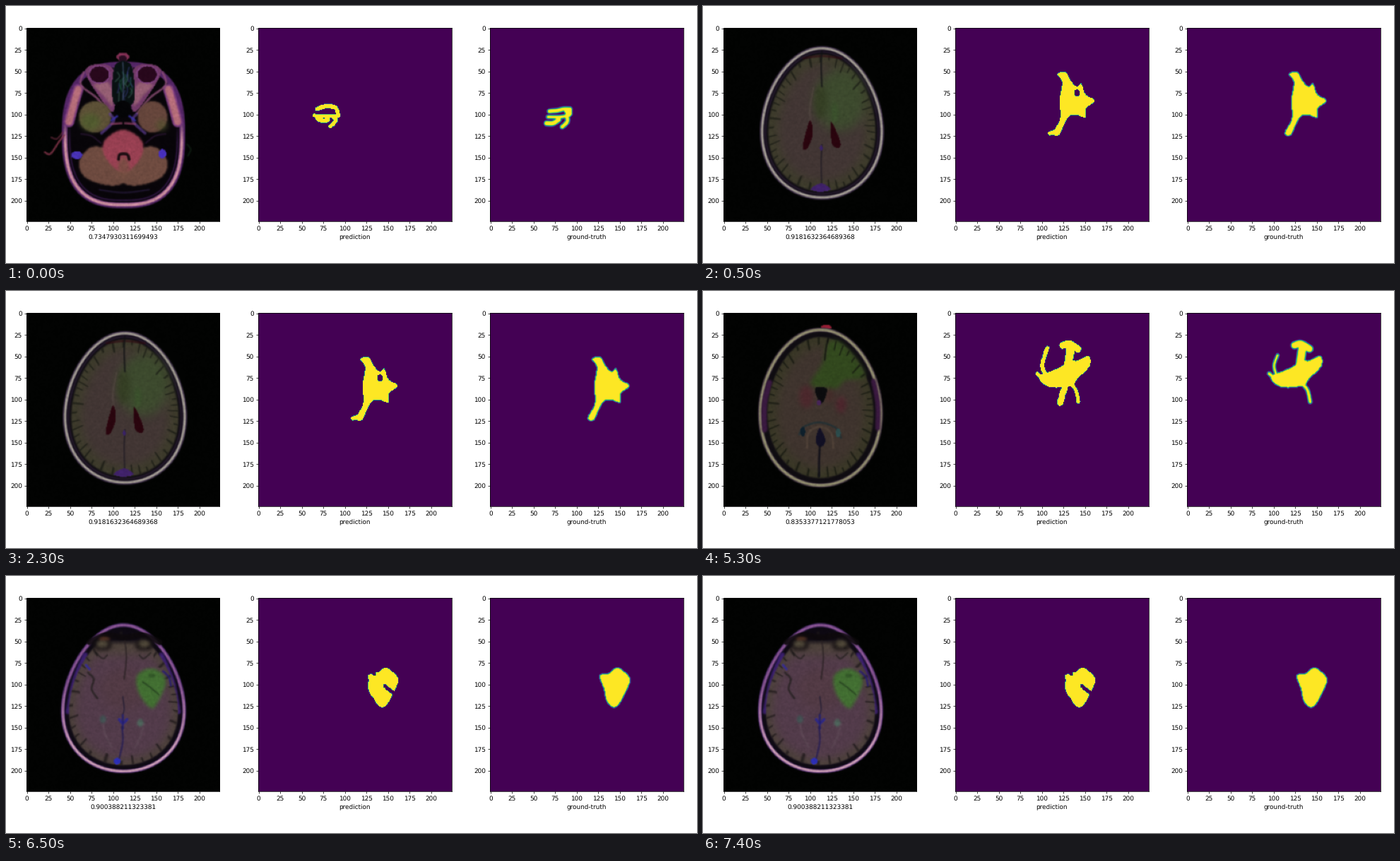
A matplotlib script for the animation above (8000 ms loop, 978x364 px).

```python
import matplotlib.pyplot as plt
import numpy as np
from matplotlib.animation import FuncAnimation
from matplotlib.path import Path

W, H, DPI = 978, 364, 64
N, SIZE = 224, 273.4
LEFT, TOP, STRIDE = 29.0, 31.2, 328.1
STEP = 500
rng = np.random.default_rng(7)

# Shapes are placed in stage pixels inside the first panel, y down.
cell = (np.arange(N) + 0.5) * SIZE / N
GX, GY = np.meshgrid(LEFT + cell, TOP + cell)
SPOTS = np.column_stack([GX.ravel(), GY.ravel()])
FREQ = np.fft.fftfreq(N)
F2 = FREQ[:, None] ** 2 + FREQ[None, :] ** 2


def blur(a, s):
    return np.fft.ifft2(np.fft.fft2(a) * np.exp(-2 * (np.pi * s) ** 2 * F2)).real


def ramp(d, soft=1.4):
    return np.clip(d / soft + 0.5, 0, 1)


def curve(pts, closed=True, n=6):
    """Catmull-Rom spline through the points."""
    p = np.array(pts, float)
    p = np.vstack([p[-1:], p, p[:2]] if closed else [p[:1], p, p[-1:]])
    t = np.arange(n)[:, None] / n
    out = [b + t / 2 * (c - a + t * (2 * a - 5 * b + 4 * c - d + t * (3 * (b - c) + d - a)))
           for a, b, c, d in zip(p, p[1:], p[2:], p[3:])]
    return np.vstack(out + [p[-2:-1]])


def blob(*pts):
    return Path(curve(pts)).contains_points(SPOTS).reshape(N, N).astype(float)


def oval(x, y, rx, ry):
    return (np.hypot((GX - x) / rx, (GY - y) / ry) < 1).astype(float)


def line(w, *pts):
    p = curve(pts, closed=False)
    dist = np.full((N, N), 1e9)
    for (x, y), (u, v) in zip(p, p[1:] - p[:-1]):
        t = np.clip(((GX - x) * u + (GY - y) * v) / (u * u + v * v), 0, 1)
        dist = np.minimum(dist, np.hypot(GX - x - t * u, GY - y - t * v))
    return ramp(w / 2 - dist)


class Scan:
    """A head slice: an egg outline with bands at set depths below the skin."""

    def __init__(self, top, bottom, rx, taper=0.0, power=2.0, cx=167, back=(2, 3, 2)):
        self.img = np.ones((N, N, 3)) * back
        cy, ry = (top + bottom) / 2, (bottom - top) / 2
        u = (GY - cy) / ry
        side = np.abs(GX - cx) / (rx * (1 + taper * np.clip(u, -1, 1)))
        f = (side ** power + np.abs(u) ** power) ** (1 / power)
        gy, gx = np.gradient(f, SIZE / N)
        self.depth = (1 - f) / np.hypot(gx, gy)
        self.angle = np.arctan2(GY - cy, GX - cx)

    def paint(self, mask, rgb, alpha=1.0, soft=0.6, twin=False):
        if twin:
            mask = np.maximum(mask, mask[:, ::-1])
        self.img += blur(mask, soft)[..., None] * alpha * (np.array(rgb) - self.img)

    def band(self, lo, hi=999, soft=1.4):
        return ramp(self.depth - lo, soft) * ramp(hi - self.depth, soft)

    def folds(self, at, count, reach, rgb):
        """Short dark grooves running inward from the brain's edge."""
        spike = np.abs(np.sin(count / 2 * self.angle + np.sin(5 * self.angle))) ** 18
        tip = at + reach * (0.4 + 0.6 * np.sin(7 * self.angle + 1) ** 2)
        self.paint(spike * self.band(at, tip), rgb, 0.75, 0.5)

    def finish(self):
        grain = blur(rng.normal(size=(N, N, 3)).sum(2), 0.8)
        return np.clip(self.img * (1 + 0.04 * grain[..., None]) / 255, 0, 1)


def skull_base():
    s = Scan(79, 286, 87, power=2.6, cx=166)
    low = ramp(GY - 178, 30)
    s.paint(oval(165, 72, 9, 6), (130, 48, 84))
    s.paint(oval(165, 75, 6, 5), (40, 12, 32))
    s.paint(s.band(0), (84, 38, 102))
    s.paint(s.band(8), (8, 5, 9))
    s.paint(s.band(2.5, 7) * low, (186, 122, 150))
    s.paint(s.band(3.8, 5.5) * low, (216, 164, 166), 0.7)
    s.paint(s.band(10, 12) * low, (62, 28, 88), 0.7)

    # Face: muscles, orbits and nose.
    s.paint(line(15, (102, 118), (96, 138), (89, 164)), (112, 52, 122), twin=True)
    s.paint(line(10, (102, 118), (96, 138), (89, 164)), (182, 110, 122), soft=1, twin=True)
    orbit = blob((112, 92), (133, 82), (152, 90), (156, 118), (151, 150), (132, 129))
    s.paint(orbit, (114, 58, 104), twin=True)
    s.paint(blob((124, 112), (146, 110), (151, 142), (137, 126)), (158, 104, 118), 0.8, 1.2, True)
    s.paint(line(3, (110, 94), (106, 112), (128, 130), (146, 152)), (140, 78, 118), 0.8, twin=True)
    s.paint(line(2, (153, 88), (158, 112), (155, 145)), (128, 68, 138), 0.8, twin=True)
    s.paint(oval(132, 97, 15.5, 13), (126, 66, 128), twin=True)
    s.paint(oval(132, 97, 13.5, 11.5), (40, 8, 28), twin=True)
    s.paint(blob((154, 84), (177, 84), (181, 134), (166, 141), (151, 134)), (9, 17, 18))
    for k in range(18):
        x, y = rng.uniform(154, 177), rng.uniform(86, 122)
        strand = line(1.5, (x, y), (x + rng.uniform(-3, 3), y + 6), (x + rng.uniform(-4, 4), y + 13))
        s.paint(strand, [(26, 84, 60), (50, 54, 116), (58, 90, 82)][k % 3], 0.7)
    s.paint(line(1.5, (165, 80), (166, 104), (165, 134)), (76, 92, 130), 0.7)
    s.paint(oval(165, 146, 12, 12), (5, 5, 7))

    # Brain: temporal lobes, cerebellum and stem.
    s.paint(oval(126, 157, 23, 22), (92, 80, 54), soft=1)
    s.paint(oval(119, 164, 14, 12), (76, 94, 44), 0.7, 3)
    s.paint(oval(207, 157, 21, 22), (102, 70, 60), soft=1)
    s.paint(oval(220, 169, 8, 8), (80, 86, 44), 0.6, 3)
    lobe = blob((103, 224), (112, 206), (130, 199), (170, 214), (170, 246), (148, 254), (114, 244))
    s.paint(lobe, (110, 75, 64), soft=1, twin=True)
    s.paint(blob((166, 175), (192, 191), (190, 215), (166, 236), (141, 215), (139, 191)),
            (152, 64, 82), soft=1.2)
    s.paint(oval(166, 229, 8, 15), (118, 80, 66), 0.8, 2)
    s.paint(line(4, (159, 217), (161, 210), (171, 210), (174, 217)), (24, 12, 16))
    s.paint(line(4, (147, 153), (152, 163), (135, 180)), (92, 60, 142), 0.7, twin=True)
    s.paint(line(3, (149, 167), (163, 166)), (150, 68, 106), 0.7, twin=True)
    s.paint(line(3, (149, 162), (157, 156)), (56, 50, 170), 0.8, twin=True)
    s.paint(line(2, (106, 181), (121, 184), (134, 194)), (52, 26, 64), 0.6, twin=True)
    s.paint(oval(100, 211, 8, 5.5), (72, 50, 180))
    s.paint(oval(221, 209, 5.5, 6.5), (72, 48, 190))
    s.paint(line(2, (132, 260), (166, 264), (202, 260)), (48, 34, 76), 0.6)
    s.paint(line(2.5, (55, 207), (63, 209), (75, 192), (82, 183)), (130, 52, 72), 0.9)
    s.paint(line(2, (64, 186), (72, 188), (80, 179)), (100, 40, 58), 0.8)
    s.paint(line(2, (256, 196), (261, 203), (257, 212)), (18, 38, 22), 0.7)
    return s.finish()


def upper_slice():
    s = Scan(57, 274, 87, taper=0.12, cx=168)
    s.paint(s.band(0), (62, 46, 74))
    s.paint(s.band(1.6, 5), (164, 158, 148))
    s.paint(s.band(5.5), (17, 14, 19))
    s.paint(s.band(7, 9), (44, 28, 56), 0.7)
    s.paint(s.band(12), (61, 59, 43), soft=0.8)
    s.paint(s.band(26), (66, 54, 52), soft=5)
    s.paint(oval(194, 133, 36, 44), (60, 76, 45), 0.9, 6)
    s.paint(oval(166, 136, 9, 24), (50, 60, 33), 0.8, 3)
    s.paint(oval(186, 151, 5, 15), (56, 86, 42), 0.5, 2)
    s.folds(12, 44, 16, (22, 24, 18))
    s.paint(line(3, (142, 74), (168, 71), (196, 74)), (48, 10, 18), 0.65)
    s.paint(line(2, (168, 64), (167, 84), (168, 114)), (17, 18, 20), 0.9)
    s.paint(line(1.8, (168, 196), (167, 225), (168, 256)), (26, 22, 32), 0.8)
    s.paint(line(2.5, (156, 116), (151, 145), (152, 162)), (84, 72, 66), 0.6)
    s.paint(blob((151, 162), (155, 182), (147, 202), (141, 198)), (42, 5, 14))
    s.paint(blob((181, 164), (194, 192), (191, 201), (182, 194)), (42, 5, 14))
    s.paint(oval(167, 201, 2, 4), (58, 34, 104))
    s.paint(blob((152, 259), (167, 251), (180, 259), (166, 263)), (64, 34, 106))
    return s.finish()


def middle_slice():
    s = Scan(52, 278, 88, taper=0.08, cx=166)
    s.paint(oval(174, 51.5, 7.5, 3.5), (150, 30, 52))
    s.paint(s.band(0), (58, 44, 60))
    s.paint(s.band(1.4, 5.2), (144, 140, 110))
    s.paint(s.band(6), (15, 12, 17))
    s.paint(line(8, (94, 130), (87, 160), (87, 196)), (58, 25, 64), soft=1)
    s.paint(line(7, (241, 128), (247, 160), (247, 194)), (58, 25, 64), soft=1)
    s.paint(s.band(13.5), (57, 55, 38), soft=0.8)
    s.paint(s.band(27), (63, 52, 46), soft=5)
    s.paint(blob((178, 72), (200, 77), (229, 119), (200, 127), (188, 138), (152, 133), (168, 104)),
            (50, 72, 30), soft=2.5)
    s.folds(13.5, 44, 16, (17, 20, 13))
    s.paint(line(2, (177, 67), (174, 80), (172, 98)), (16, 16, 14), 0.9)
    s.paint(oval(146, 150, 10, 16), (80, 36, 44), 0.75, 3)
    s.paint(oval(195, 161, 7, 12), (82, 32, 44), 0.75, 3)
    s.paint(oval(178, 148, 7, 10), (72, 40, 40), 0.6, 3)
    s.paint(blob((158, 138), (175, 139), (167, 160)), (12, 12, 14))
    s.paint(oval(164, 158, 3, 4), (70, 36, 88))
    s.paint(line(2.5, (136, 203), (143, 192), (165, 186), (188, 194), (195, 208)), (28, 46, 52), 0.8)
    s.paint(oval(141, 199, 3.5, 6.5), (14, 32, 44))
    s.paint(oval(191, 201, 3.5, 6.5), (44, 76, 76))
    s.paint(line(3, (147, 222), (149, 201), (165, 192), (181, 201), (184, 222)), (88, 72, 60), 0.6)
    s.paint(blob((165, 194), (173, 212), (166, 221), (159, 212)), (18, 16, 36))
    s.paint(line(3, (165, 220), (164, 240), (164, 262)), (15, 14, 23), 0.9)
    return s.finish()


def lower_slice():
    s = Scan(67, 279, 87, taper=0.18, cx=166)
    low = ramp(GY - 200, 90)
    s.paint(s.band(0), (84, 48, 116))
    s.paint(s.band(1.4, 4.4), (140, 88, 146))
    s.paint(s.band(1.4, 4.6) * low, (204, 160, 182))
    s.paint(s.band(5.2), (13, 9, 18))
    s.paint(line(7, (112, 112), (97, 148), (88, 192)), (58, 30, 112), soft=1, twin=True)
    s.paint(s.band(11.5) * ramp(GY - 94, 8), (76, 65, 58), soft=0.8)
    s.paint(s.band(20) * ramp(GY - 112, 12), (82, 59, 74), soft=5)
    s.paint(oval(166, 160, 33, 30), (82, 58, 66), 0.7, 6)
    s.folds(11.5, 32, 13, (28, 23, 24))
    s.paint(line(8, (118, 94), (140, 84), (167, 87), (194, 84), (217, 94)), (13, 9, 12), 0.9)
    s.paint(oval(136, 98, 14, 8), (20, 15, 17), 0.8, 2, True)
    s.paint(oval(136, 96, 8, 5), (90, 82, 64), 0.85, 2, True)
    s.paint(oval(139, 89, 8, 2.5), (106, 62, 40), 0.7, 1.5)
    s.paint(line(3, (116, 137), (124, 146), (121, 160), (129, 173)), (30, 28, 26), 0.7, twin=True)
    s.paint(line(2, (127, 109), (137, 117), (143, 112)), (28, 26, 24), 0.7, twin=True)
    s.paint(blob((186, 140), (208, 131), (226, 148), (213, 181), (203, 186), (187, 164)),
            (66, 110, 50), soft=1.8)
    s.paint(line(2, (193, 150), (203, 157), (216, 168)), (30, 54, 26), 0.7)
    s.paint(oval(206, 141, 5, 3), (36, 66, 30), 0.6, 1)
    s.paint(line(3, (222, 135), (230, 143), (233, 155)), (38, 26, 116), 0.8)
    s.paint(line(3, (113, 126), (118, 132)), (48, 40, 168), 0.8)
    s.paint(line(2, (168, 92), (170, 116), (167, 146)), (38, 30, 32), 0.8)
    s.paint(line(2, (165, 171), (167, 188), (165, 196)), (34, 28, 50), 0.8)
    s.paint(line(4, (160, 203), (165, 208), (171, 203)), (42, 38, 140), 0.9)
    s.paint(line(3, (165, 197), (165, 216)), (34, 30, 110), 0.9)
    s.paint(line(2.5, (164, 214), (165, 234), (160, 258)), (36, 28, 84), 0.8)
    s.paint(oval(157, 262, 5, 4.5), (44, 46, 180))
    s.paint(oval(137, 203, 4.5, 5.5), (62, 86, 84), 0.8, 1.2)
    s.paint(oval(190, 208, 4.5, 5.5), (74, 106, 92), 0.8, 1.2)
    s.paint(line(3, (137, 210), (141, 226), (149, 242)), (96, 76, 88), 0.5, twin=True)
    return s.finish()


def union(*masks):
    return np.maximum.reduce(masks)


def truth(mask):
    return np.clip(blur(mask, 0.6), 0, 1)


def predicted(mask, bite=0):
    """A hard mask with bites taken out and a slightly ragged edge."""
    rough = blur(rng.normal(size=(N, N)), 1)
    return (blur(np.clip(mask - bite, 0, 1), 0.5) + 0.3 * rough > 0.5).astype(float)


claw = union(line(6, (113, 149), (124, 148), (133, 146), (142, 146)), oval(140, 150, 5.5, 7),
             line(5, (139, 155), (129, 157), (111, 157)), line(7, (109, 166), (118, 166), (126, 161)),
             line(6, (138, 157), (138, 164), (131, 171)))
claw_guess = union(line(6, (112, 146), (124, 142), (138, 144), (142, 155)),
                   line(5, (108, 155), (120, 156), (140, 156)),
                   line(6, (112, 159), (120, 163), (128, 161)),
                   line(6, (136, 158), (138, 163), (131, 170)))
kite = blob((173, 96), (185, 94), (191, 104), (200, 114), (207, 110), (213, 125), (226, 134),
            (214, 145), (213, 158), (200, 154), (189, 157), (181, 172), (175, 183), (167, 180),
            (177, 160), (177, 142), (177, 128), (180, 108))
body = union(blob((147, 122), (168, 112), (180, 106), (190, 96), (200, 99), (217, 92), (219, 106),
                  (202, 124), (193, 134), (162, 136)),
             line(10, (181, 77), (190, 75), (202, 82)), line(12, (192, 80), (189, 102)),
             line(5, (145, 117), (153, 124)), line(5, (190, 130), (199, 140), (203, 157)))
wedge = blob((184, 141), (196, 138), (208, 130), (218, 135), (227, 147), (220, 165),
             (213, 179), (204, 186), (194, 177), (190, 160))
truths = [truth(m) for m in
          (claw, kite, union(body, line(4, (156, 121), (152, 106), (157, 91))), wedge)]
predictions = [
    predicted(claw_guess),
    predicted(union(kite, line(6, (163, 180), (175, 177))), oval(201, 123, 4, 5)),
    predicted(union(body, line(6, (156, 118), (152, 104), (159, 81)),
                    line(9, (184, 135), (177, 158)))),
    predicted(union(wedge, oval(197, 155, 13, 19)),
              union(line(5, (208, 156), (222, 167)), oval(193, 138, 2.5, 3))),
]
scans = [skull_base(), upper_slice(), middle_slice(), lower_slice()]
scores = ["0.7347930311699493", "0.9181632364689368",
          "0.8353377121778053", "0.900388211323381"]
starts = [0, 500, 3500, 6500]

plt.rcParams.update({"font.family": "DejaVu Sans", "text.hinting": "none"})
fig = plt.figure(figsize=(W / DPI, H / DPI), dpi=DPI, facecolor="white")
columns = (scans, predictions, truths)
axes, images = [], []
for i, data in enumerate(columns):
    ax = fig.add_axes([(LEFT + i * STRIDE) / W, 1 - (TOP + SIZE) / H, SIZE / W, SIZE / H])
    images.append(ax.imshow(data[0], cmap="viridis", vmin=0, vmax=1, aspect="auto"))
    ax.set(xticks=range(0, 201, 25), yticks=range(0, 201, 25),
           xlabel=("", "prediction", "ground-truth")[i])
    axes.append(ax)


def update(k):
    i = sum(k * STEP >= t for t in starts) - 1
    for im, data in zip(images, columns):
        im.set_data(data[i])
    axes[0].set_xlabel(scores[i])
    return images


anim = FuncAnimation(fig, update, frames=8000 // STEP, interval=STEP, repeat=True)
plt.show()
```
